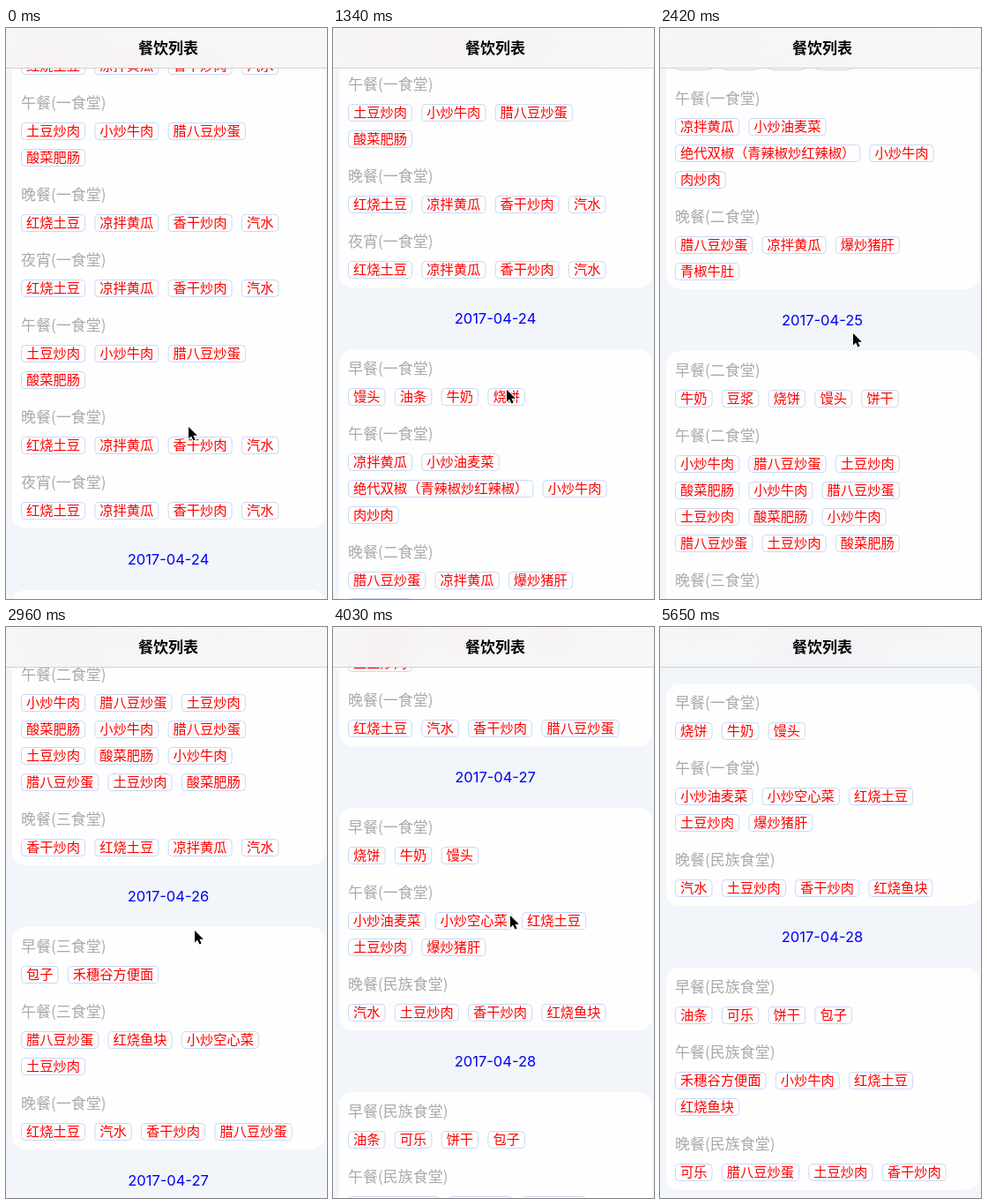
These frames come from a looping animation (364x647 px, 7.82 s). An HTML page with a canvas:

```html
<!DOCTYPE html>
<html lang="zh">
<head>
<meta charset="utf-8">
<title>餐饮列表</title>
<style>
  html, body { margin: 0; width: 100%; height: 100%; overflow: hidden; background: #f2f5fa; }
  canvas { display: block; width: 364px; height: 647px; }
</style>
</head>
<body>
<canvas id="stage"></canvas>
<script>
const W = 364, H = 647, BAR = 45, LOOP = 7820, STEP = 268.8;
const CJK = '"Noto Sans CJK SC", "Noto Sans CJK", "Noto Sans CJK JP", sans-serif';
const LATIN = 'Inter, Roboto, sans-serif';

const evening = '(一食堂) 红烧土豆 凉拌黄瓜 香干炒肉 汽水';
const noon = '午餐(一食堂) 土豆炒肉 小炒牛肉 腊八豆炒蛋 酸菜肥肠';
const days = [
  ['2017-04-23', '夜宵' + evening, noon, '晚餐' + evening, '夜宵' + evening,
    noon, '晚餐' + evening, '夜宵' + evening],
  ['2017-04-24', '早餐(一食堂) 馒头 油条 牛奶 烧饼',
    '午餐(一食堂) 凉拌黄瓜 小炒油麦菜 绝代双椒（青辣椒炒红辣椒） 小炒牛肉 肉炒肉',
    '晚餐(二食堂) 腊八豆炒蛋 凉拌黄瓜 爆炒猪肝 青椒牛肚'],
  ['2017-04-25', '早餐(二食堂) 牛奶 豆浆 烧饼 馒头 饼干',
    '午餐(二食堂)' + ' 小炒牛肉 腊八豆炒蛋 土豆炒肉 酸菜肥肠'.repeat(3),
    '晚餐(三食堂) 香干炒肉 红烧土豆 凉拌黄瓜 汽水'],
  ['2017-04-26', '早餐(三食堂) 包子 禾穗谷方便面',
    '午餐(三食堂) 腊八豆炒蛋 红烧鱼块 小炒空心菜 土豆炒肉',
    '晚餐(一食堂) 红烧土豆 汽水 香干炒肉 腊八豆炒蛋'],
  ['2017-04-27', '早餐(一食堂) 烧饼 牛奶 馒头',
    '午餐(一食堂) 小炒油麦菜 小炒空心菜 红烧土豆 土豆炒肉 爆炒猪肝',
    '晚餐(民族食堂) 汽水 土豆炒肉 香干炒肉 红烧鱼块'],
  ['2017-04-28', '早餐(民族食堂) 油条 可乐 饼干 包子',
    '午餐(民族食堂) 禾穗谷方便面 小炒牛肉 红烧土豆 红烧鱼块',
    '晚餐(民族食堂) 可乐 腊八豆炒蛋 土豆炒肉 香干炒肉']
];

// Distance of the list from its resting place at each step
const scroll = [1659, 1583, 1530, 1452, 1420, 1386, 1289, 1225, 1147, 1006, 800,
  598, 502, 441, 320, 141, 40, -35, -10, -0.5, 0, 0];
// step, x, y of the pointer tip
const pointer = [[0, 207, 452], [5, 197, 410], [9, 219, 346], [11, 214, 344],
  [15, 201, 327], [17, 198, 302], [19, 204, 455], [20, 204, 455]];

const canvas = document.getElementById('stage');
const ctx = canvas.getContext('2d');
const dpr = window.devicePixelRatio || 1;
canvas.width = W * dpr;
canvas.height = H * dpr;

// Lay the cards out from the top, then shift so the last one ends at y = 638
function layout() {
  const items = [], add = (kind, y, text, x, w) => items.push({ kind, y, text, x, w });
  let y = 0;
  for (const [date, ...meals] of days) {
    add('date', y - 35, date);
    const card = { kind: 'card', y };
    items.push(card);
    y += 22;
    for (const meal of meals) {
      const [label, ...dishes] = meal.split(' ');
      add('label', y, label);
      y += 32;
      let x = 17;
      for (const dish of dishes) {
        const w = dish.length * 15.25 + 12;
        if (x + w > 345) { x = 17; y += 30; }
        add('tag', y, dish, x, w);
        x += w + 10.3;
      }
      y += 42;
    }
    y -= 22;
    card.h = y - card.y;
    y += 70;
  }
  const shift = 638 - (y - 70);
  for (const it of items) it.y += shift;
  return items;
}
const items = layout();

function box(x, y, w, h, r) {
  ctx.beginPath();
  ctx.roundRect(x, y, w, h, r);
}

function write(text, x, y, size, color, align = 'left', weight = 400, family = CJK) {
  ctx.font = `${weight} ${size}px ${family}`;
  ctx.fillStyle = color;
  ctx.textAlign = align;
  ctx.fillText(text, x, y + size * (family === CJK ? 0.34 : 0.36));
}

const paint = {
  card(it, y) {
    ctx.fillStyle = '#fefefe';
    box(7, y, 355, it.h, 15);
    ctx.fill();
  },
  date(it, y) { write(it.text, 184, y, 16.5, '#0000f5', 'center', 400, LATIN); },
  label(it, y) { write(it.text, 17, y, 17, '#aaaaaa'); },
  tag(it, y) {
    ctx.strokeStyle = '#c9d8f8';
    ctx.lineWidth = 1;
    box(it.x + 0.5, y - 9.5, it.w - 1, 19, 4);
    ctx.stroke();
    write(it.text, it.x + 6, y, 15.25, '#ff0000');
  }
};

function drawList(off, top, bottom) {
  ctx.fillStyle = '#f2f5fa';
  ctx.fillRect(0, top, W, bottom - top);
  for (const it of items) {
    const y = it.y + off;
    if (y < bottom + 20 && y + (it.h || 0) > top - 20) paint[it.kind](it, y);
  }
}

// Translucent bar: the list shows through, blurred
function drawBar(off) {
  ctx.save();
  ctx.beginPath();
  ctx.rect(0, 0, W, BAR);
  ctx.clip();
  ctx.filter = `blur(${18 * dpr}px)`;
  drawList(off, -60, BAR + 60);
  ctx.filter = 'none';
  ctx.fillStyle = 'rgba(247,247,247,0.8)';
  ctx.fillRect(0, 0, W, BAR);
  ctx.restore();
  ctx.fillStyle = '#c8c8ca';
  ctx.fillRect(0, BAR, W, 0.8);
  write('餐饮列表', 184, 23.6, 17, '#000', 'center', 600);
}

function drawPointer(step) {
  const i = pointer.findIndex(p => p[0] >= step);
  if (i < 0) return;
  const b = pointer[i], a = pointer[Math.max(0, i - 1)];
  const k = b === a ? 0 : (step - a[0]) / (b[0] - a[0]);
  ctx.save();
  ctx.translate(a[1] + (b[1] - a[1]) * k, a[2] + (b[2] - a[2]) * k);
  ctx.beginPath();
  ctx.moveTo(0, 0);
  for (const [x, y] of [[0, 13.5], [3.1, 10.6], [5.4, 15.6], [7.6, 14.6], [5.4, 9.8], [9.8, 9.8]])
    ctx.lineTo(x, y);
  ctx.closePath();
  ctx.strokeStyle = '#fff';
  ctx.lineWidth = 2;
  ctx.stroke();
  ctx.fillStyle = '#000';
  ctx.fill();
  ctx.restore();
}

let shown = -1;
const start = performance.now();

function tick() {
  const t = (performance.now() - start) % LOOP;
  const step = Math.min(scroll.length - 1, Math.floor((t + 6) / STEP));
  if (step !== shown) {
    shown = step;
    ctx.setTransform(dpr, 0, 0, dpr, 0, 0);
    drawList(scroll[step], 0, H);
    drawBar(scroll[step]);
    drawPointer(step);
  }
  requestAnimationFrame(tick);
}
tick();
</script>
</body>
</html>
```
